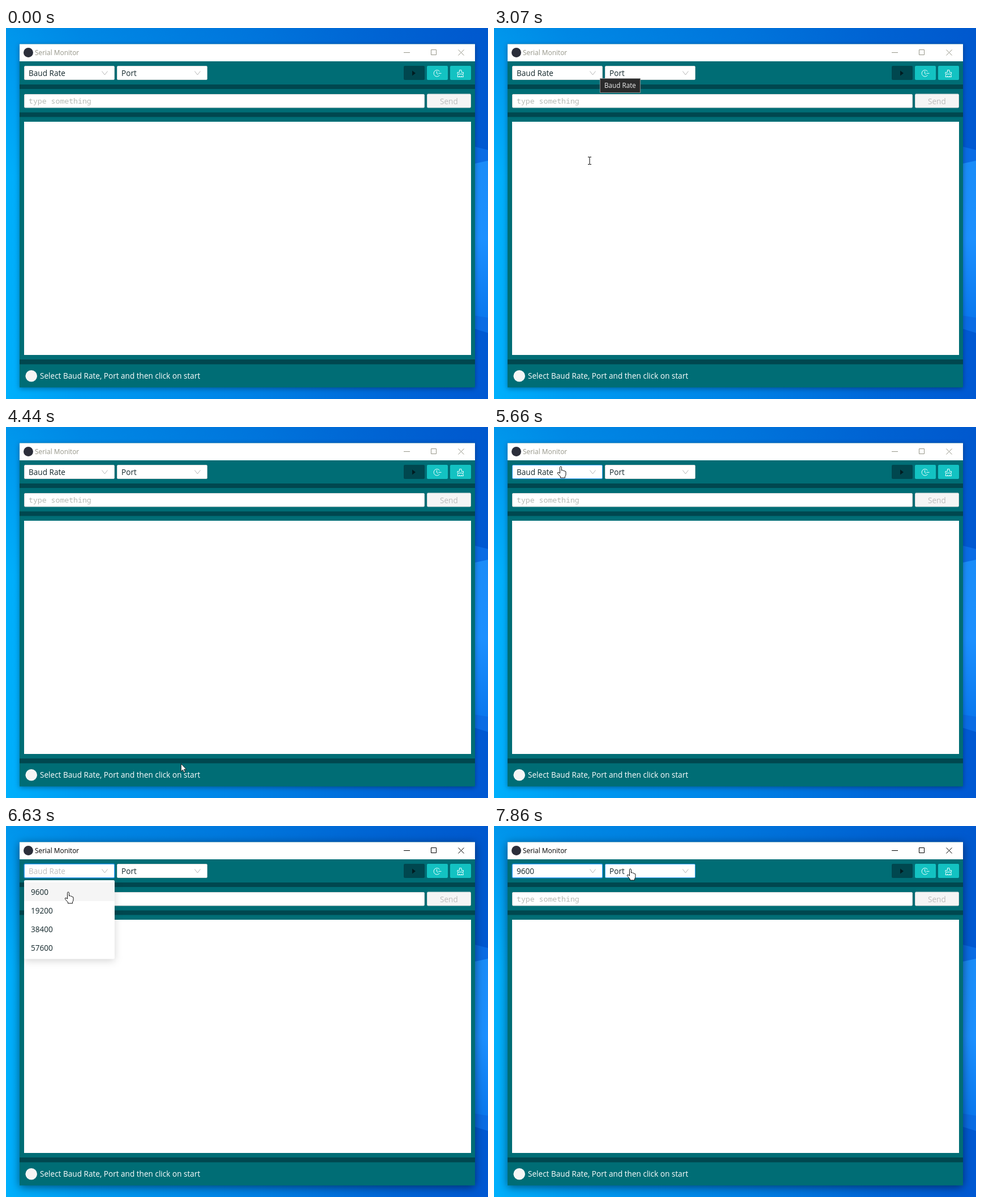
An HTML page for the animation above (8 s loop, 852 px wide and 657 px high).

```html
<!DOCTYPE html>
<html lang="en">
<head>
<meta charset="utf-8">
<title>Serial Monitor</title>
<style>
html, body { margin: 0; width: 100%; height: 100%; overflow: hidden; }
svg { display: block; width: 852px; height: 657px; font: 13.6px "Open Sans", "Noto Sans", sans-serif; cursor: default; }
#win { filter: drop-shadow(0 2px 4px rgba(0,0,0,.35)); }
#win.active { filter: drop-shadow(0 3px 8px rgba(0,0,0,.5)); }
#chrome { color: #969689; }
.active #chrome { color: #000; }
#popup .sheet { filter: drop-shadow(0 3px 7px rgba(0,0,0,.17)); }
.field { fill: #fff; stroke: #d9d9d9; }
.field.hover { stroke: #40a9ff; }
.field.focus { stroke: #40a9ff; filter: drop-shadow(0 0 1px #1890ff); }
.line { fill: none; stroke: currentColor; }
.ink { fill: #14282c; }
.mono { font: 13.2px "Noto Sans Mono", "DejaVu Sans Mono", monospace; fill: #b5b9b4; }
</style>
</head>
<body>
<svg viewBox="0 0 852 657">
  <defs>
    <linearGradient id="sky">
      <stop offset="0" stop-color="#00b0fc"/><stop offset=".15" stop-color="#009cf2"/>
      <stop offset=".5" stop-color="#0082e6"/><stop offset=".8" stop-color="#0066d8"/>
      <stop offset="1" stop-color="#0058d2"/>
    </linearGradient>
    <linearGradient id="dusk" x2="0" y2="1">
      <stop offset="0" stop-color="#0058c4" stop-opacity=".3"/>
      <stop offset=".4" stop-color="#0058c4" stop-opacity="0"/>
    </linearGradient>
    <linearGradient id="glow" x2="0" y2="1">
      <stop offset="0" stop-color="#1a8cf8"/><stop offset=".5" stop-color="#1c90ff"/>
      <stop offset="1" stop-color="#0a78ee"/>
    </linearGradient>
    <path id="chevron" class="line" d="M-5-3.5 0 3 5-3.5" color="#b5b5b5"/>
  </defs>
  <rect width="852" height="657" fill="url(#sky)"/>
  <rect width="852" height="657" fill="url(#dusk)"/>
  <path d="M820 208 852 216V540L820 530z" fill="#0a6ce4"/>
  <path d="M820 242 852 235V513L820 508z" fill="url(#glow)"/>

  <g id="win">
    <path d="M24 28.5h805v608H24z" fill="#006d75"/>
    <path d="M24 28.5h805V59H24z" fill="#fff"/>
    <path d="M24 100h805v8H24zM24 149.5h805v8H24zM24 587h805v8.5H24z" fill="#00474f"/>
    <circle cx="39.5" cy="43.5" r="8.5" fill="#2b2e3a"/>
    <g id="chrome">
      <text x="51" y="48" font-size="11.9" fill="currentColor">Serial Monitor</text>
      <path class="line" d="M703 43.5h11M751.5 38.5h9v9h-9zM799.5 38.5l10 10m0-10-10 10"/>
    </g>
    <rect id="baud" class="field" x="32.5" y="67.5" width="159" height="24" rx="1.5"/>
    <rect id="port" class="field" x="196.5" y="67.5" width="159" height="24" rx="1.5"/>
    <text id="rate" x="40" y="85" class="ink">Baud Rate</text>
    <text x="204" y="85" class="ink">Port</text>
    <use href="#chevron" x="174.5" y="80"/>
    <use href="#chevron" x="338.5" y="80"/>
    <rect x="703" y="67" width="37" height="25" rx="2" fill="#00474f"/>
    <path d="M718 75.500v9l6-4.500z" fill="#001c21"/>
    <rect x="744" y="67" width="37" height="25" rx="2" fill="#13c2c2"/>
    <rect x="785" y="67" width="37" height="25" rx="2" fill="#13c2c2"/>
    <path class="line" color="#f0ffff" d="M766.500 77A5.700 5.700 0 1 0 766.500 83.500M761.500 76.500V80.500l2.500 2M764.500 80.300h5M798 86.500h10.500l-1-5h-8.500zM798 81.500v-3h3.500v-4h3.500v4h3.500v3M801.500 86.500v-2M805 86.500v-2"/>
    <rect id="input" class="field" x="32.5" y="117.5" width="707" height="23.500" rx="1.5"/>
    <text x="40" y="133.500" class="mono">type something</text>
    <rect x="744.5" y="117" width="77" height="24" rx="1.5" fill="#f5f5f5" stroke="#d9d9d9"/>
    <text x="767" y="135" fill="#bcbcbc">Send</text>
    <path d="M32 166h790v413H32z" fill="#fff"/>
    <circle cx="44.7" cy="616.3" r="10.3" fill="#f5f5f5"/>
    <text x="60" y="621" fill="#fff">Select Baud Rate, Port and then click on start</text>
  </g>

  <g id="popup">
    <rect class="sheet" x="32" y="96" width="160" height="139.500" rx="2" fill="#fff"/>
    <rect x="32" y="100" width="160" height="33" fill="#f5f5f5"/>
    <g class="ink">
      <text x="44" y="122">9600</text><text x="44" y="155">19200</text>
      <text x="44" y="188">38400</text><text x="44" y="220.500">57600</text>
    </g>
  </g>
  <g id="tip">
    <rect x="187.500" y="89.500" width="71" height="25" fill="#2b2b2b" stroke="#8c8c8c"/>
    <text x="195" y="106" font-size="11.700" fill="#eee">Baud Rate</text>
  </g>

  <g id="cursor">
    <path id="arrow" d="M.5.5v13.500l3-3 2 4.700 2.200-1-2-4.500h4z" fill="#fff" stroke="#000" stroke-width=".8"/>
    <path id="beam" class="line" d="M-3-6.500h2.500l.5.500.5-.5H3M0-6V6M-3 6.500h2.500l.5-.5.5.5H3"/>
    <path id="hand" d="M-1.500 10V1.500Q-1.500 0 0 0T1.500 1.500V7Q4 5.500 4.500 7.500 6.500 6.500 7 8.500 9 8 9 10V14Q9 16 7.500 17.500V20H-.500V18L-5.500 12.500Q-6 10-4 10.300L-1.500 12z" fill="#fff" stroke="#111"/>
  </g>
</svg>
<script>
const $ = id => document.getElementById(id);
const LOOP = 8000, STEP = 68;
const ENTRY = [703, 652];
// pointer moves: start time, number of steps, end x, end y
const moves = [
  [910, 3, 469, 224], [1440, 4, 292, 107],
  [1910, 3, 207, 79], [2120, 5, 186, 70],
  [3070, 1, 169, 235], [3140, 4, 126, 562],
  [3480, 2, 122, 587], [3630, 4, 73, 616], [3930, 5, 257, 596], [4300, 3, 309, 596],
  [4840, 4, 134, 244], [5240, 7, 118, 70], [6350, 5, 110, 117],
  [7250, 4, 168, 103], [7520, 3, 217, 95], [7720, 3, 241, 76]
];
const clamp = v => Math.max(0, Math.min(1, v));
const inside = (x, y, l, t, r, b) => x >= l && x <= r && y >= t && y <= b;
const show = (id, on) => $(id).style.display = on ? '' : 'none';

function pointer(t) {
  let [x, y] = ENTRY;
  for (const [start, n, ex, ey] of moves) {
    if (t < start) break;
    const p = Math.min(n, Math.floor((t - start) / STEP + 1.05)) / n;
    x += (ex - x) * p;
    y += (ey - y) * p;
  }
  return [x, y];
}

function draw(t) {
  const [x, y] = pointer(t);
  const open = t >= 5930 && t < 7170;
  const chosen = t >= 6970;
  const overBaud = inside(x, y, 32, 67, 192, 92);
  const overPort = inside(x, y, 196, 67, 356, 92);
  const overInput = !open && inside(x, y, 32, 117, 740, 141);
  const overItem = open && inside(x, y, 32, 96, 192, 235);
  const hand = overBaud || overPort || overItem;
  const beam = !hand && (overInput || inside(x, y, 32, 166, 822, 579));

  show('cursor', t >= 910);
  show('hand', hand);
  show('beam', beam);
  show('arrow', !hand && !beam);
  $('cursor').setAttribute('transform', `translate(${Math.round(x)} ${Math.round(y)})`);

  $('baud').classList.toggle('hover', overBaud);
  $('baud').classList.toggle('focus', t >= 5930);
  $('port').classList.toggle('hover', overPort);
  $('input').classList.toggle('hover', overInput);
  $('win').classList.toggle('active', t >= 5930);
  $('rate').textContent = chosen ? '9600' : 'Baud Rate';
  $('rate').style.fill = open && !chosen ? '#bfbfbf' : '';

  const shown = clamp((t - 5900) / 220) * clamp((7190 - t) / 220);
  show('popup', open);
  $('popup').setAttribute('opacity', shown);
  $('popup').setAttribute('transform', `translate(0 96) scale(1 ${.8 + .2 * shown}) translate(0 -96)`);
  show('tip', t >= 2800 && t < 3210);
}

const begin = performance.now();
function frame() {
  draw((performance.now() - begin) % LOOP);
  requestAnimationFrame(frame);
}
frame();
</script>
</body>
</html>
```
